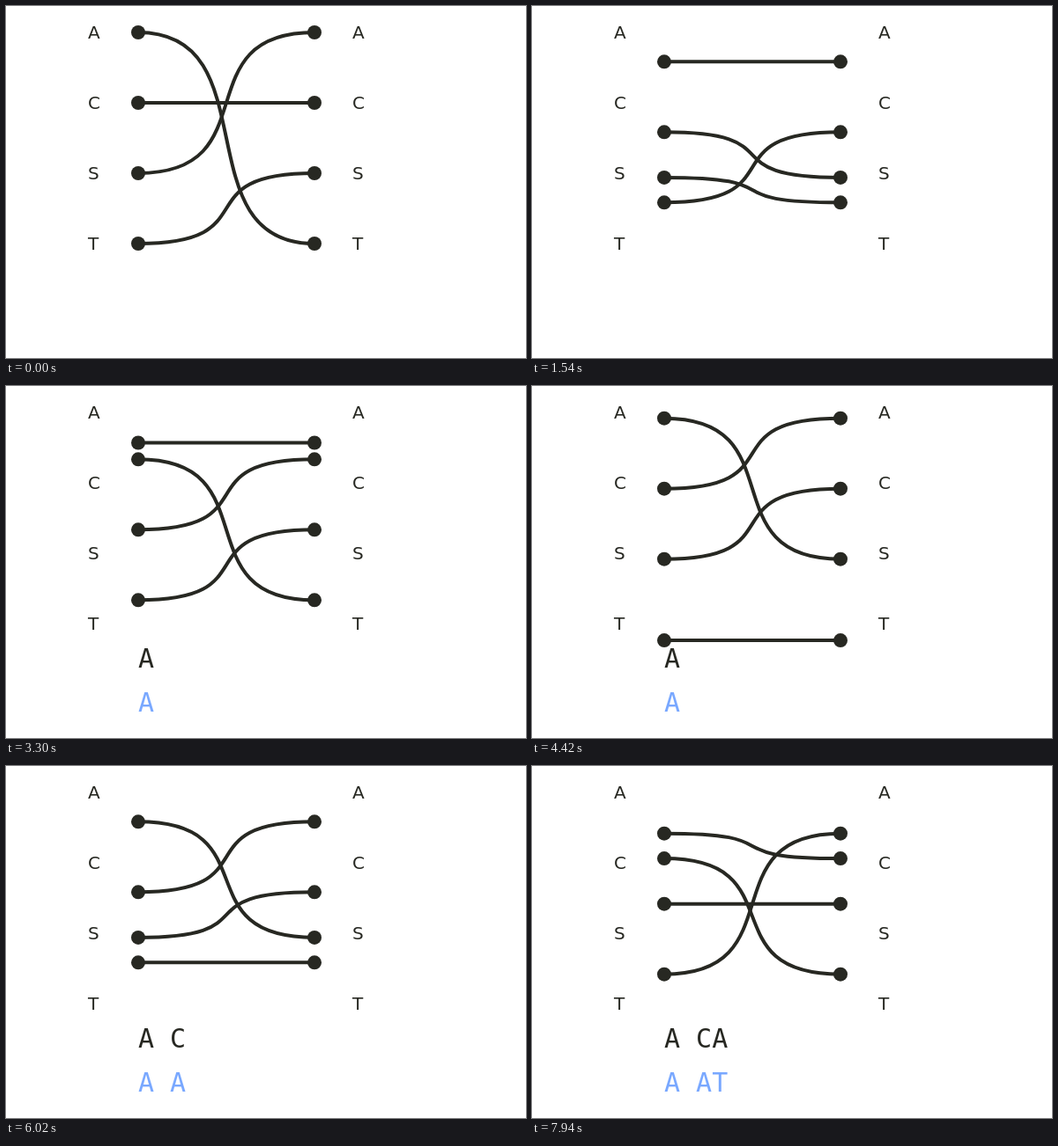
Animation, 590 px wide and 400 px high, one loop 8000 ms. Source, as an HTML page:

```html
<!DOCTYPE html>
<html lang="en">
<head>
<meta charset="utf-8">
<title>Rotating letter wiring</title>
<style>
  html, body { margin: 0; width: 100%; height: 100%; overflow: hidden; background: #fff; }
  svg { display: block; width: 590px; height: 400px; }
  text { white-space: pre; fill: #272822; }
  .label { font: 20px "DejaVu Sans", sans-serif; }
  .tape { font: 30px "DejaVu Sans Mono", monospace; }
  #coded { fill: #79a8ff; }
  .wire { fill: none; stroke: #272822; stroke-width: 4; }
  .dot { fill: #272822; }
</style>
</head>
<body>
<svg id="stage" viewBox="0 0 590 400">
  <text id="plain" class="tape" x="150" y="320"></text>
  <text id="coded" class="tape" x="150" y="370"></text>
</svg>
<script>
const LOOP = 8000, START = 420, TICK = 80;
const TURN = 24, CYCLE = 28;           // ticks per turn, ticks per turn plus rest
const LEFT = 150, RIGHT = 350, TOP = 30, GAP = 80;
const LETTERS = "ACST";
const WIRING = [3, 1, 0, 2];
const PLAIN = "A CA", CODED = "A AT";
const SHOWN = [0, 1, 3, 4];            // characters visible after each turn

const stage = document.getElementById("stage");
const plain = document.getElementById("plain");
const coded = document.getElementById("coded");

function add(tag, attrs) {
  const el = document.createElementNS("http://www.w3.org/2000/svg", tag);
  for (const name in attrs) el.setAttribute(name, attrs[name]);
  return stage.appendChild(el);
}

[...LETTERS].forEach((letter, i) => {
  for (const x of [93, 393]) {
    add("text", { class: "label", x, y: TOP + GAP * i + 7 }).textContent = letter;
  }
});

const wires = WIRING.map((to, from) => ({
  from, to,
  path: add("path", { class: "wire" }),
  a: add("circle", { class: "dot", cx: LEFT, r: 8 }),
  b: add("circle", { class: "dot", cx: RIGHT, r: 8 })
}));

// Cubic that dips below 0 and rises above 1
function swing(p) {
  const r = 1 - p, c = 0.52;
  return -3 * r * r * p * c + 3 * r * p * p * (1 + c) + p * p * p;
}

// The top slot swings down to the bottom, the others move up by one
function slotY(slot, p) {
  return slot === 0 ? TOP + 3 * GAP * swing(p) : TOP + GAP * (slot - p);
}

function draw(time) {
  const tick = Math.max(0, Math.floor((time - START) / TICK));
  const turn = Math.floor(tick / CYCLE);
  const step = tick % CYCLE;
  const p = Math.min(step / TURN, 1);
  const y = i => slotY((i - turn + 8) % 4, p);

  for (const w of wires) {
    const y1 = y(w.from), y2 = y(w.to);
    w.a.setAttribute("cy", y1);
    w.b.setAttribute("cy", y2);
    w.path.setAttribute("d", `M${LEFT} ${y1}C${LEFT + 150} ${y1} ${RIGHT - 150} ${y2} ${RIGHT} ${y2}`);
  }

  const count = SHOWN[turn + (step > TURN ? 1 : 0)];
  plain.textContent = PLAIN.slice(0, count);
  coded.textContent = CODED.slice(0, count);
}

const begin = performance.now();
function frame() {
  draw((performance.now() - begin) % LOOP);
  requestAnimationFrame(frame);
}
frame();
</script>
</body>
</html>
```
